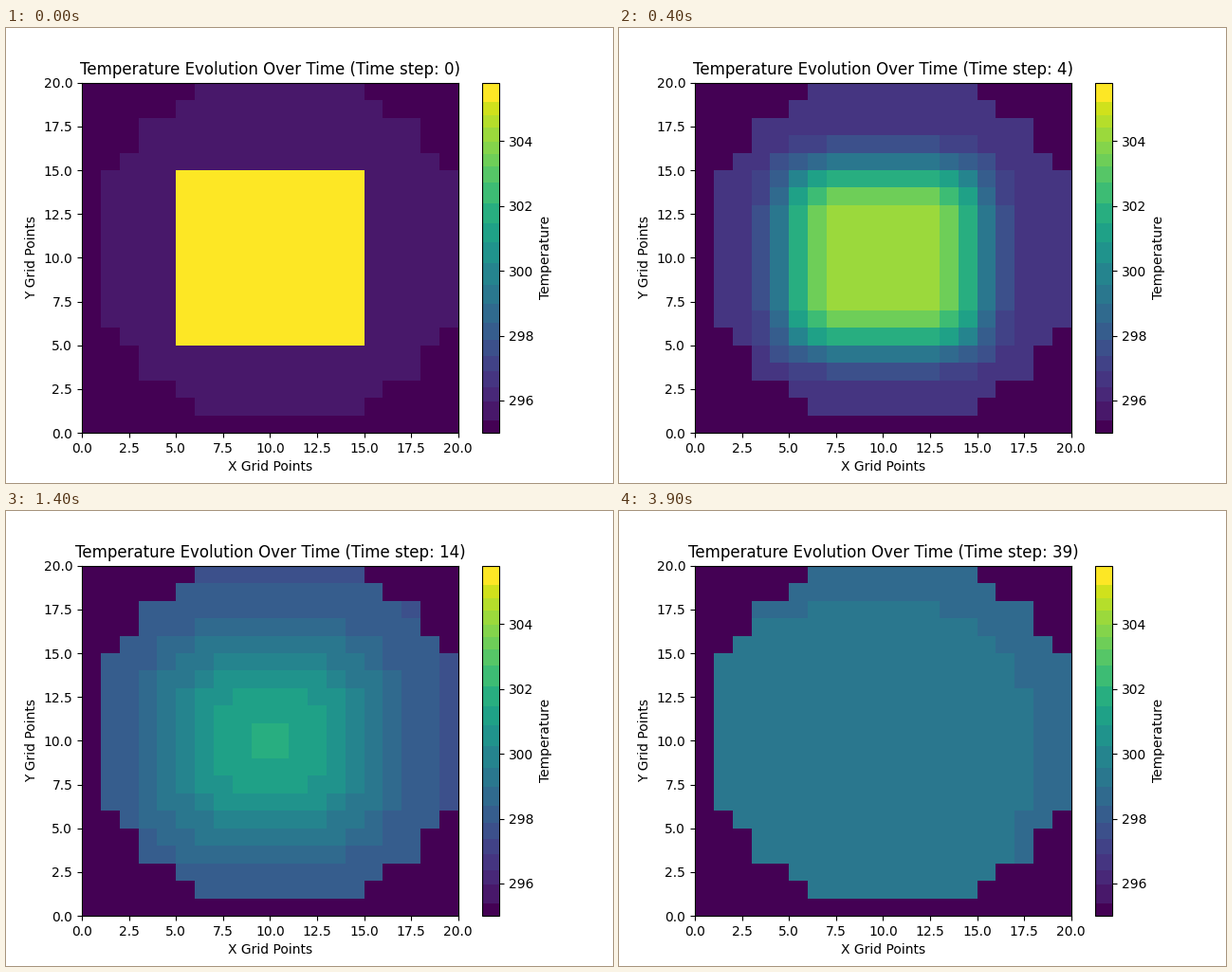
Animation, 640 px wide and 480 px high, one loop 4 s. Source, as a matplotlib script:

```python
import numpy as np
import matplotlib.pyplot as plt
from matplotlib.animation import FuncAnimation
from matplotlib.colors import ListedColormap

SIZE, STEPS, INTERVAL = 20, 40, 100
COLD, HOT, OUTSIDE = 295.8, 305.8, 295.0
DIFFUSION, MIXING = 0.2, 0.06


def banded_viridis(n=1024):
    """Viridis reduced to flat bands, with its exact end colours kept."""
    edges = [0.035, 0.09, 0.13, 0.175, 0.22, 0.265, 0.315, 0.368, 0.422,
             0.484, 0.545, 0.60, 0.655, 0.715, 0.76, 0.795, 0.83, 0.872,
             0.908, 0.945]
    bounds = np.array([0, *edges, 1])
    levels = (bounds[:-1] + bounds[1:]) / 2
    levels[0], levels[-1] = 0, 1
    band = np.digitize(np.linspace(0, 1, n), edges)
    return ListedColormap(plt.get_cmap("viridis")(levels[band]))


def step(temp, disc):
    """Diffuse between neighbours inside the disc and mix towards its mean."""
    t, m = np.pad(temp, 1), np.pad(disc, 1)
    flux = np.zeros_like(temp)
    for axis in (0, 1):
        for shift in (-1, 1):
            near = np.roll(t, shift, axis)[1:-1, 1:-1]
            inside = np.roll(m, shift, axis)[1:-1, 1:-1]
            flux += np.where(inside, near - temp, 0)
    mean = temp[disc].mean()
    new = temp + DIFFUSION * flux
    new += MIXING * (mean - new)
    return np.where(disc, new, OUTSIDE)


def simulate():
    y, x = np.mgrid[:SIZE, :SIZE] - SIZE // 2
    disc = x**2 + y**2 < (SIZE // 2) ** 2
    temp = np.where(disc, COLD, OUTSIDE)
    temp[5:15, 5:15] = HOT
    fields = [temp]
    for _ in range(STEPS - 1):
        fields.append(step(fields[-1], disc))
    return fields


fields = simulate()
fig, ax = plt.subplots(figsize=(6.4, 4.8), dpi=100)
mesh = ax.pcolormesh(fields[0], cmap=banded_viridis(), vmin=OUTSIDE, vmax=HOT)
fig.colorbar(mesh, label="Temperature")
ax.set_xlabel("X Grid Points")
ax.set_ylabel("Y Grid Points")
title = ax.set_title("")


def update(i):
    mesh.set_array(fields[i])
    title.set_text(f"Temperature Evolution Over Time (Time step: {i})")
    return mesh, title


anim = FuncAnimation(fig, update, frames=STEPS, interval=INTERVAL,
                     init_func=lambda: update(0), repeat=True)
plt.show()
```
